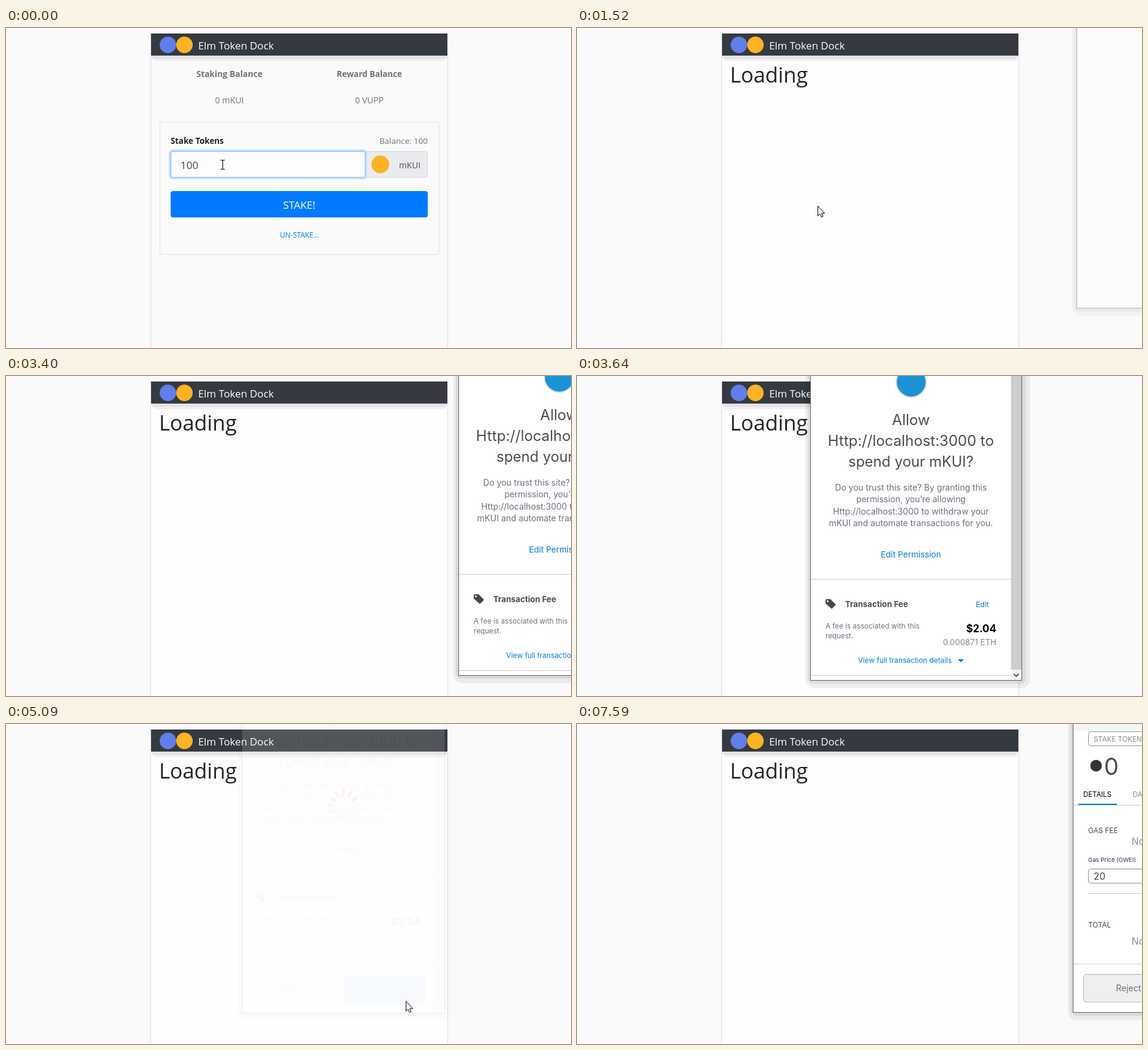
Write an HTML page that moves like this. It is 923 px wide and 522 px high and loops after 8 s.

```html
<!DOCTYPE html>
<html lang="en">
<head>
<meta charset="utf-8">
<title>Staking walkthrough</title>
<style>
  html, body { margin: 0; width: 100%; height: 100%; overflow: hidden; background: #fafafa; }
  svg { display: block; width: 923px; height: 522px; }
  .page { font-family: "Open Sans", sans-serif; }
  .wallet { font-family: Inter, sans-serif; }
  text { white-space: pre; }
</style>
</head>
<body>
<svg id="stage" viewBox="0 0 923 522"></svg>
<script>
const LOOP = 8000;
const BLUE = '#007bff', LINK = '#037dd6', GREY = '#6c757d', INK = '#4d4d4d';

// The picture only changes at these moments.
const TICKS = [0, 550, 670, 790, 920, 1040, 1160, 1280, 1400, 1520, 1660, 1810, 1950, 2230,
  2630, 2750, 3400, 3520, 3640, 3760, 3910, 4060, 4190, 4310, 4430, 4550, 4670, 4790, 4940,
  5090, 5210, 5360, 5480, 5600, 5720, 6000, 7590];

const text = (x, y, size, fill, str, anchor = 'start', weight = 400) =>
  `<text x="${x}" y="${y}" font-size="${size}" fill="${fill}" text-anchor="${anchor}" font-weight="${weight}">${str}</text>`;
const mid = (x, y, size, fill, str, weight) => text(x, y, size, fill, str, 'middle', weight);
const end = (x, y, size, fill, str, weight) => text(x, y, size, fill, str, 'end', weight);
const box = (x, y, w, h, fill, extra = '') =>
  `<rect x="${x}" y="${y}" width="${w}" height="${h}" fill="${fill}" ${extra}/>`;
const disc = (x, y, r, fill, extra = '') => `<circle cx="${x}" cy="${y}" r="${r}" fill="${fill}" ${extra}/>`;
const rule = (x, y, w, color = '#cdcdcd') => box(x, y, w, 1, color);
const group = (id, body, extra = '') => `<g id="${id}" ${extra}>${body}</g>`;

const petals = Array.from({ length: 12 }, (_, i) =>
  box(-2.5, -28, 5, 13, '#f0b63c', `rx="1.5" opacity="${1 - i / 12}" transform="rotate(${-30 * i})"`)).join('');

const frame =
  box(236.5, 9.5, 485, 530, 'none', 'stroke="#e2e2e4" stroke-width="1.5"') +
  group('panel', box(237, 45, 484, 480, '#fefefe')) +
  box(237, 36, 484, 18, '#f1eff2', 'rx="9"') +
  box(237, 36, 484, 14, '#e5e2e7', 'rx="6"') +
  box(237, 9, 484, 36, '#343a40') +
  disc(264.5, 27.5, 13.5, '#627eea') + disc(291.5, 27.5, 13.5, '#fbb324') +
  text(314, 35, 16.8, '#fff', 'Elm Token Dock');

const form =
  mid(365, 80, 13.6, GREY, 'Staking Balance', 700) + mid(593.5, 80, 13.4, GREY, 'Reward Balance', 700) +
  mid(365, 123, 13.9, GREY, '0 mKUI') + mid(593.5, 123, 13.9, GREY, '0 VUPP') +
  box(251.5, 153.5, 456, 216, '#fafafa', 'rx="3.5" stroke="#dfdfdf"') +
  text(269, 189, 13.3, '#212529', 'Stake Tokens', 'start', 700) +
  end(689, 189, 13.4, GREY, 'Balance: 100') +
  box(580.5, 201.5, 108, 42, '#e9ecef', 'rx="3.5" stroke="#ced4da"') +
  disc(611.5, 222.5, 14.5, '#fbb324') + mid(659.5, 229, 13.8, '#495057', 'mKUI') +
  group('glow', box(268, 200, 320, 45, 'none', 'rx="4" stroke="#bfdeff" stroke-width="3.5"')) +
  box(269.5, 201.5, 317, 42, '#fdfdfd', 'id="field" rx="3"') +
  text(285, 230, 17.1, '#495057', '100') +
  box(314, 210, 1, 25, '#333', 'id="caret"') +
  box(269, 266, 420, 43, BLUE, 'id="button" rx="4"') + mid(479, 295, 17, '#fff', 'STAKE!') +
  mid(479.5, 342, 11.8, BLUE, 'UN-STAKE...');

const permission =
  disc(544, -73, 25.5, '#d9dde0') + disc(544, -73, 23.5, '#1c92d6') +
  mid(543.5, -3, 24, INK, 'Allow') +
  mid(543.5, 31, 24, INK, 'Http://localhost:3000 to') + mid(543.5, 65, 23.6, INK, 'spend your mKUI?') +
  ['Do you trust this site? By granting this', 'permission, you’re allowing',
    'Http://localhost:3000 to withdraw your', 'mKUI and automate transactions for you.']
    .map((line, i) => mid(543.5, 104 + 19.4 * i, 13.9, '#6a737d', line)).join('') +
  mid(543.5, 213, 13.5, LINK, 'Edit Permission') +
  rule(380, 248, 327) +
  '<path d="M404 283q0-2 2-2h6l8 8q1 1 0 2l-5 5q-1 1-2 0l-9-8z" fill="#484848"/>' + disc(407.5, 284.5, 1.4, '#fff') +
  text(436, 294, 13.2, INK, 'Transaction Fee', 'start', 700) + end(671, 294, 12, LINK, 'Edit') +
  text(404, 329, 11.7, '#6a737d', 'A fee is associated with this') + text(404, 345, 11.7, '#6a737d', 'request.') +
  end(683, 335, 16.8, '#000', '$2.04', 700) + end(683, 356, 13.2, '#8a8a8a', '0.000871 ETH') +
  text(457, 385, 11.8, LINK, 'View full transaction details') + `<path d="M620 379h10l-5 5z" fill="${LINK}"/>` +
  rule(380, 405, 327) +
  box(396.5, 422.5, 139, 45, '#fff', 'rx="5" stroke="#bbc0c5"') + mid(466, 450, 14, '#6a737d', 'Reject') +
  box(552, 422, 139, 46, LINK, 'rx="5"') + mid(621.5, 450, 14, '#fff', 'Confirm');

const scrollbar =
  box(707, -50, 17, 517, '#cdcdcd') + box(707, 467, 17, 17, '#f3f3f3') +
  '<path d="M711.5 474l4 4 4-4" fill="none" stroke="#505050" stroke-width="1.8"/>';

const transaction =
  box(835.5, 12.5, 120, 23, '#fff', 'rx="4" stroke="#8f8f8f"') + text(844, 29, 11.5, '#888', 'STAKE TOKENS') +
  disc(848, 68, 9.5, '#343434') + text(861, 83, 38, INK, '0') +
  text(827, 119, 11.4, '#000', 'DETAILS') + text(908, 119, 11.4, '#888', 'DATA') +
  rule(811, 132, 345) + box(819, 130, 63, 2, LINK) +
  text(835, 178, 11.8, INK, 'GAS FEE') +
  group('fees',
    text(906, 197, 15.5, '#8a8f9c', 'No Conversion Rate Available') +
    text(835, 225, 9.6, '#22355e', 'Gas Price (GWEI)') +
    box(835.5, 236.5, 140, 23, '#fff', 'rx="3" stroke="#8f8f8f"') + text(844, 254, 15.4, '#444', '20') +
    rule(835, 276, 300) +
    text(835, 332, 11.8, INK, 'TOTAL') + text(906, 360, 15.5, '#8a8f9c', 'No Conversion Rate Available') +
    rule(811, 391, 345) +
    box(827.5, 408.5, 148, 45, '#efefef', 'rx="5" stroke="#b4b4b4"') + mid(901, 436, 14, '#6a737d', 'Reject'));

const wallet =
  box(371, -50, 367, 547, '#000', 'rx="14" opacity=".06"') +
  box(375, -50, 356, 540, '#000', 'rx="8" opacity=".07"') +
  box(379.5, -50.5, 345, 535, '#fff', 'stroke="#606060"') +
  group('inside',
    group('permission', permission) + group('scrollbar', scrollbar) +
    group('confirming', group('strip', box(811, 0, 345, 11, '#f4f5f6')) + group('transaction', transaction), 'transform="translate(-431 14)"') +
    group('loading', box(380, -50, 345, 535, '#fff', 'opacity=".8"') +
      group('spinner', petals)), 'clip-path="url(#window)"');

const pointers =
  group('beam', '<path d="M-3.5-7.5h2.5l1 1 1-1h2.5M-3.5 7.5h2.5l1-1 1 1h2.5M0-7V7" fill="none" stroke="#111" stroke-width="1.2"/>') +
  group('arrow', '<path d="M.5.5V16.5L4 13.2 6.3 18.5 8.8 17.4 6.5 12.2H11.5Z" fill="#fff" stroke="#000"/>') +
  group('hand', '<path d="M-2 1.5Q0-1 2 1.5V8L3.5 7.2Q5 7 5.5 8.5 7.5 7 8.5 9 11 8.5 11 11V15Q11 18 9 21.5H0L-5.5 13Q-6.5 10-4 10.5L-2 12.5Z" fill="#fff" stroke="#000"/>' +
    '<path d="M2 8v4M5.5 8.5V12M8.5 9v3.5" stroke="#000"/>');

const stage = document.getElementById('stage');
stage.innerHTML =
  '<clipPath id="window"><rect x="380" y="-50" width="344" height="534"/></clipPath>' +
  box(0, 0, 923, 522, '#fafafa') +
  group('page', frame + group('form', form) + group('waiting', text(250, 89, 34.3, '#212529', 'Loading')), 'class="page"') +
  group('wallet', wallet, 'class="wallet"') + group('pointer', pointers);

const el = id => document.getElementById(id);
const show = (id, on) => el(id).setAttribute('display', on ? 'inline' : 'none');
const set = (id, name, value) => el(id).setAttribute(name, value);
const within = (t, from, to) => t >= from && t < to;

// Linear interpolation through [time, value, value, ...] keys.
function along(keys, t) {
  const i = keys.findIndex(k => k[0] > t);
  if (i < 0) return keys[keys.length - 1].slice(1);
  if (i === 0) return keys[0].slice(1);
  const a = keys[i - 1], b = keys[i], p = (t - a[0]) / (b[0] - a[0]);
  return a.slice(1).map((v, j) => v + (b[j + 1] - v) * p);
}

const POINTER_PATH = [[550, 354, 223], [670, 357, 225], [1040, 389, 284], [1160, 391, 290], [1520, 393, 290],
  [1810, 424, 183], [3910, 424, 183], [3911, 578, 228], [4060, 578, 228], [4430, 640, 440], [4670, 653, 452]];
const WINDOW_PATH = [[2750, 811, -14], [3399, 811, -14], [3400, 740, 4], [3520, 580, 19], [3640, 382, 12], [3760, 380, 0],
  [5209, 380, 0], [5210, 811, -14]];
const OPACITY = [[1400, 0], [1520, .5], [1660, 1], [4940, 1], [5090, .14], [5210, 0], [5360, 0], [5600, 1]];

function pointerKind(t) {
  if (t < 790 || within(t, 3910, 4190)) return 'beam';
  if (within(t, 920, 1400) || within(t, 4430, 4790)) return 'hand';
  if (within(t, 790, 1950) || within(t, 4190, 5360)) return 'arrow';
  return '';
}

function draw(t) {
  const staking = t < 1400, focused = t < 1160, second = t >= 5210;
  show('form', staking);
  show('waiting', !staking);
  show('panel', !staking);
  show('glow', focused);
  show('caret', within(t, 550, 1160));
  set('field', 'stroke', focused ? '#80bdff' : '#ced4da');
  const [g, b] = along([[790, 123, 255], [1160, 105, 217]], t);
  set('button', 'fill', `rgb(0,${Math.round(g)},${Math.round(b)})`);

  const [x, y] = along(WINDOW_PATH, t), [opacity] = along(OPACITY, t);
  const shrink = opacity < 1 ? ' translate(21.2 6) scale(.96)' : '';
  show('wallet', opacity > 0);
  set('wallet', 'opacity', opacity);
  set('wallet', 'transform', `translate(${x - 380} ${y})${shrink}`);

  show('permission', within(t, 2230, 5210));
  show('scrollbar', within(t, 2230, 5210));
  set('permission', 'transform', `translate(0 ${t < 2630 ? 61 : t < 4060 ? 71 : 0})`);
  show('confirming', second);
  show('strip', t >= 5720);
  show('transaction', t >= 6000);
  set('fees', 'transform', `translate(0 ${t < 7590 ? 10 : 0})`);
  show('loading', within(t, 4670, 5210));
  set('spinner', 'transform', `translate(552 132) rotate(${t < 4790 ? 0 : t < 4940 ? 30 : 60})`);

  const kind = pointerKind(t), [px, py] = along(POINTER_PATH, t);
  for (const id of ['beam', 'arrow', 'hand']) show(id, id === kind);
  set('pointer', 'transform', `translate(${Math.round(px)} ${Math.round(py)})`);
}

const start = performance.now();
function loop() {
  const t = (performance.now() - start) % LOOP;
  draw(TICKS.findLast(tick => tick <= t) ?? 0);
  requestAnimationFrame(loop);
}
loop();
</script>
</body>
</html>
```
